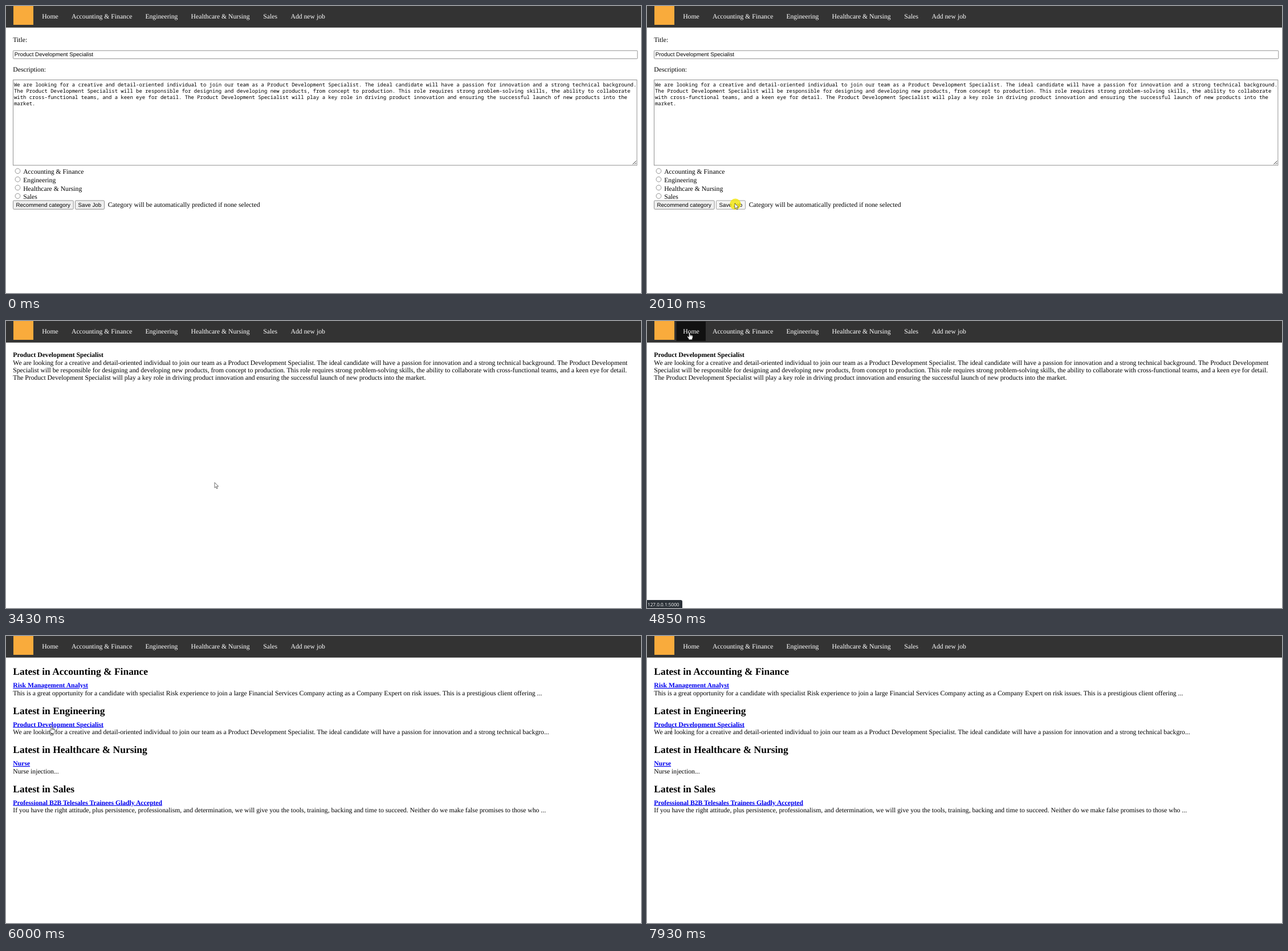
Write an HTML page that moves like this. It is 1114 px wide and 503 px high and loops after 8 s.

```html
<!DOCTYPE html>
<html lang="en">
<head>
<meta charset="utf-8">
<title>Job board</title>
<style>
  html, body { margin: 0; width: 100%; height: 100%; overflow: hidden; background: #fff; }
  svg { display: block; width: 1114px; height: 503px; }
  text { font: 11.68px "Liberation Serif", serif; text-rendering: geometricPrecision; }
  .nav { fill: #fff; }
  .bold { font-weight: bold; }
  .link { font-weight: bold; fill: #00e; text-decoration: underline; }
  .heading { font-size: 17.48px; font-weight: bold; }
  .ui { font: 9.75px "Liberation Sans", sans-serif; }
  .mono { font: 8.94px "Noto Sans Mono", monospace; }
  .status { font: 8.2px "Open Sans", sans-serif; fill: #fff; }
  .field { fill: #fff; stroke: #767676; stroke-width: .8; }
  .button { fill: #efefef; stroke: #767676; stroke-width: .8; }
  .button.hover { fill: #e5e5e5; stroke: #4f4f4f; }
  .button.pressed { fill: #f5f5f5; stroke: #8d8d8d; }
  .field.hover { stroke: #222; }
  #cursor path { fill: #fff; stroke: #222; stroke-width: .65; stroke-linejoin: round; }
  #cursor #beam { fill: none; }
</style>
</head>
<body>
<svg viewBox="0 0 1114 503">
  <rect width="1114" height="37.8" fill="#333"/>
  <rect id="homeHover" x="51.5" y="1" width="51.5" height="34" fill="#111"/>
  <rect x="13" y="-2" width="35" height="35" fill="#f9ab3c"/>
  <g id="nav"></g>
  <g id="form"></g>
  <g id="detail"></g>
  <g id="home"></g>
  <g id="status">
    <path id="statusBox" fill="#2b3138"/>
    <text id="statusText" class="status" x="1" y="500"></text>
  </g>
  <circle id="click" r="9.7" fill="#f3e608" opacity=".8"/>
  <g id="cursor">
    <path id="arrow" d="M0 0V9.4L2.1 7.4 3.6 10.9 5.1 10.2 3.6 6.8H6.7Z"/>
    <path id="hand" d="M-1 1Q-1 0 0 0T1 1V4L4.7 4.9Q5.7 5.2 5.7 6.5V9L4.8 11V12.8H-1.2V11.4L-3.7 8Q-4 6.5-2.7 6.8L-1 8.2ZM1 4V6.6M2.6 4.5V6.8M4.2 4.8V7"/>
    <path id="beam" d="M-1.7-5.2H-.5L0-4.8.5-5.2H1.7M0-4.8V4.8M-1.7 5.2H-.5L0 4.8.5 5.2H1.7"/>
  </g>
</svg>
<script>
const $ = id => document.getElementById(id);
const text = (x, y, str, cls = "") => `<text x="${x}" y="${y}" class="${cls}">${str}</text>`;
const box = (cls, x, y, w, h, id = "", r = 0) =>
  `<rect class="${cls}" id="${id}" x="${x}" y="${y}" width="${w}" height="${h}" rx="${r}"/>`;
const show = (id, on) => $(id).style.display = on ? "" : "none";

const categories = ["Accounting &amp; Finance", "Engineering", "Healthcare &amp; Nursing", "Sales"];
const jobTitle = "Product Development Specialist";

const navX = [63.2, 115, 244.4, 324.6, 451.3, 499.5];
$("nav").innerHTML = ["Home", ...categories, "Add new job"]
  .map((label, i) => text(navX[i], 21.6, label, "nav")).join("");

const areaLines = [
  "We are looking for a creative and detail-oriented individual to join our team as a Product Development Specialist. The ideal candidate will have a passion for innovation and a strong technical background.",
  "The Product Development Specialist will be responsible for designing and developing new products, from concept to production. This role requires strong problem-solving skills, the ability to collaborate",
  "with cross-functional teams, and a keen eye for detail. The Product Development Specialist will play a key role in driving product innovation and ensuring the successful launch of new products into the",
  "market."];
$("form").innerHTML =
  text(12.3, 63, "Title:") + box("field", 12.5, 78.2, 1095.3, 14.2, "", 1) + text(14.8, 88.3, jobTitle, "ui") +
  text(12.3, 115, "Description:") + box("field", 12.5, 129.6, 1094.4, 149.5, "area") +
  areaLines.map((line, i) => text(14, 140.7 + i * 11.05, line, "mono")).join("") +
  `<path d="M1099.5 277.5L1105.5 271.5M1103 277.5L1105.5 275" stroke="#333"/>` +
  categories.map((label, i) =>
    `<circle class="field" cx="20.5" cy="${289.2 + i * 14.6}" r="4.4"/>` +
    text(30.2, 294.3 + i * 14.6, label)).join("") +
  box("button", 12.5, 341, 105.7, 15.2, "", 1.6) + text(17.4, 351.6, "Recommend category", "ui") +
  box("button", 121.5, 341, 51, 15.2, "save", 1.6) + text(126.5, 351.6, "Save Job", "ui") +
  text(178.8, 351.8, "Category will be automatically predicted if none selected");

$("detail").innerHTML = text(12.3, 63, jobTitle, "bold") + [
  "We are looking for a creative and detail-oriented individual to join our team as a Product Development Specialist. The ideal candidate will have a passion for innovation and a strong technical background. The Product Development",
  "Specialist will be responsible for designing and developing new products, from concept to production. This role requires strong problem-solving skills, the ability to collaborate with cross-functional teams, and a keen eye for detail.",
  "The Product Development Specialist will play a key role in driving product innovation and ensuring the successful launch of new products into the market."
].map((line, i) => text(12.3, 76.6 + i * 13.4, line)).join("");

$("home").innerHTML = [
  ["Risk Management Analyst", "This is a great opportunity for a candidate with specialist Risk experience to join a large Financial Services Company acting as a Company Expert on risk issues. This is a prestigious client offering ..."],
  [jobTitle, "We are looking for a creative and detail-oriented individual to join our team as a Product Development Specialist. The ideal candidate will have a passion for innovation and a strong technical backgro..."],
  ["Nurse", "Nurse injection..."],
  ["Professional B2B Telesales Trainees Gladly Accepted", "If you have the right attitude, plus persistence, professionalism, and determination, we will give you the tools, training, backing and time to succeed. Neither do we make false promises to those who ..."]
].map(([title, intro], i) => {
  const y = i * 68.5;
  return text(12.3, 68.2 + y, "Latest in " + categories[i], "heading") +
    text(12.3, 90 + y, title, "link") + text(12.3, 103.5 + y, intro);
}).join("");

// Pointer moves: first step, last step, number of steps, evenly timed waypoints.
const moves = [
  [300, 590, 5, [[420, 555], [340, 380], [300, 240]]],
  [970, 1750, 12, [[300, 240], [290, 250], [220, 310], [160, 345], [154, 346]]],
  [2480, 2830, 6, [[154, 346], [230, 325], [340, 290], [366, 283]]],
  [3960, 4590, 10, [[366, 283], [330, 250], [200, 130], [100, 40], [74.5, 20]]],
  [5250, 6000, 12, [[74.5, 20], [81.5, 30], [84, 85], [82, 135], [80, 158]]],
  [6950, 7720, 12, [[80, 158], [81, 160], [186, 161], [130, 163], [57, 166]]],
  [7790, 7930, 3, [[57, 166], [43, 166.5]]]
];

function pointer(t) {
  const [start, end, steps, points] = moves.filter(m => t >= m[0]).pop();
  const step = Math.floor((t - start) / (end - start) * (steps - 1) + .2);
  const u = Math.min(1, (step + 1) / steps) * (points.length - 1);
  const i = Math.min(Math.floor(u), points.length - 2);
  return [0, 1].map(k => points[i][k] + (points[i + 1][k] - points[i][k]) * (u - i));
}

function cursorKind(page, x, y) {
  if (y < 36) return x > 51 && x < 103 ? "hand" : "arrow";
  if (page === "form") return y > 129 && y < 279 ? "beam" : "arrow";
  if (page === "detail") return y > 54 && y < 106 ? "beam" : "arrow";
  const row = (y - 54) % 68.5;
  if (row >= 26 && row < 39) return x < 171 ? "hand" : "arrow";
  return row < 17 || row >= 39 && row < 53 ? "beam" : "arrow";
}

const within = (t, from, to) => t >= from && t < to;
const clamp = v => Math.max(0, Math.min(1, v));
const fade = (t, on, shown, off, gone) => clamp((t - on) / (shown - on)) * clamp((gone - t) / (gone - off));

function draw(t) {
  const page = t < 3430 ? "form" : t < 4980 ? "detail" : "home";
  for (const id of ["form", "detail", "home"]) show(id, id === page);

  const visible = t >= 300;
  const [x, y] = visible ? pointer(t) : [-50, -50];
  const kind = cursorKind(page, x, y);
  for (const id of ["arrow", "hand", "beam"]) show(id, visible && id === kind);
  $("cursor").setAttribute("transform", `translate(${x} ${y})`);

  const press = within(t, 2010, 2480);
  show("click", press || within(t, 4720, 4850));
  $("click").setAttribute("cx", x + 1);
  $("click").setAttribute("cy", y + 1.3);

  const overSave = x > 121 && x < 173 && y > 341 && y < 357;
  $("save").setAttribute("class", "button" + (press ? " pressed" : overSave ? " hover" : ""));
  $("area").setAttribute("class", "field" + (kind === "beam" ? " hover" : ""));
  show("homeHover", y < 36 && kind === "hand" && !within(t, 4980, 5250));

  const onLink = t > 6000;
  const width = onLink ? 175.5 : 62;
  $("statusBox").setAttribute("d", `M0 489H${width - 3}Q${width} 489 ${width} 492V503H0Z`);
  $("statusText").textContent = "127.0.0.1:5000" + (onLink ? "/Engineering/1711724647184" : "");
  $("status").setAttribute("opacity",
    onLink ? fade(t, 6100, 6210, 7300, 7450) : fade(t, 4590, 4700, 5250, 5400));
}

function tick() {
  draw(performance.now() % 8000);
  requestAnimationFrame(tick);
}
tick();
</script>
</body>
</html>
```
